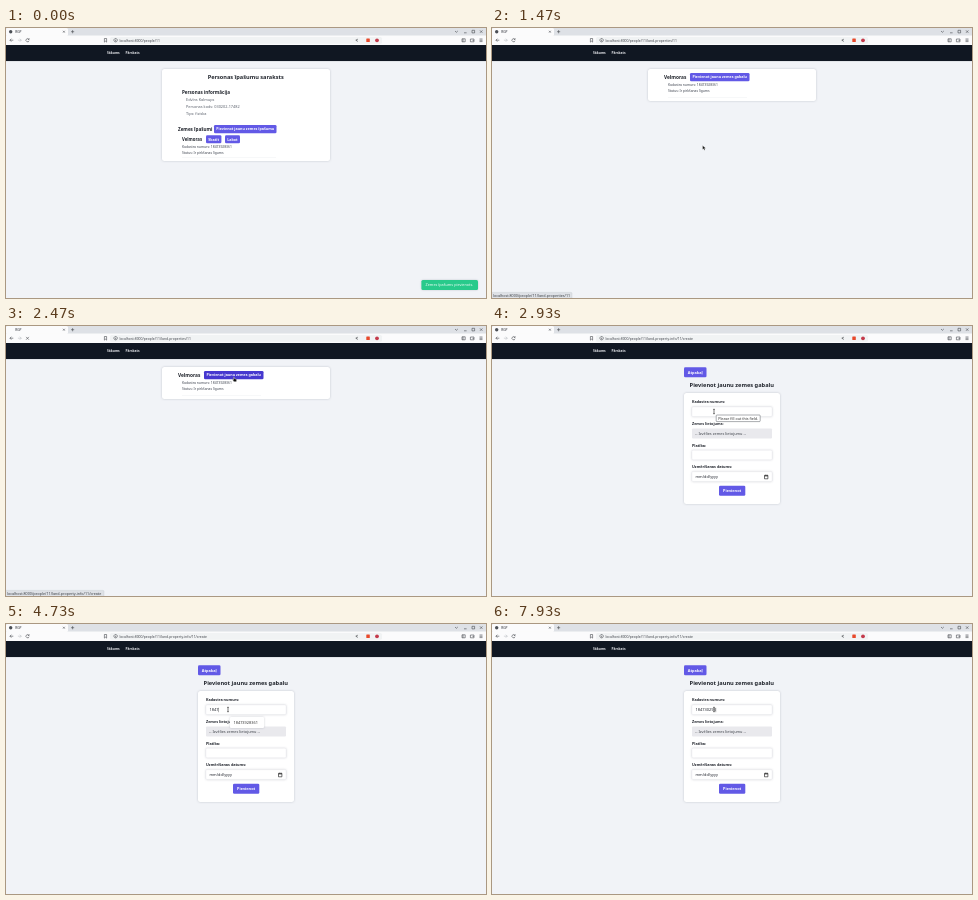
These frames come from a looping animation (480x270 px, 8 s). An HTML page:

```html
<!DOCTYPE html>
<html lang="lv">
<head>
<meta charset="utf-8">
<title>RGP</title>
<style>
html, body { margin: 0; width: 100%; height: 100%; overflow: hidden; background: #f1f3f7; }
svg { display: block; width: 480px; height: 270px; }
text { font-family: "Noto Sans", "Open Sans", sans-serif; white-space: pre; }
.bold { font-weight: 700; }
.card { filter: drop-shadow(0 .5px .8px rgba(20, 25, 50, .2)); }
.line { fill: none; stroke-width: .6; stroke: #45484d; }
</style>
</head>
<body>
<svg id="stage" viewBox="0 0 480 270"></svg>
<script>
const LOOP = 8000, STEP = 1000 / 15;
const INK = '#20242c', SOFT = '#5c626d', INDIGO = '#6259e6', INDIGO_DARK = '#4638cf';
const stage = document.getElementById('stage');

function add(parent, tag, attrs, content) {
  const el = document.createElementNS('http://www.w3.org/2000/svg', tag);
  for (const key in attrs) el.setAttribute(key, attrs[key]);
  if (content) el.textContent = content;
  return parent.appendChild(el);
}
const group = (parent = stage) => add(parent, 'g', {});
const box = (g, x, y, w, h, fill, rx = 0, more = {}) =>
  add(g, 'rect', { x, y, width: w, height: h, fill, rx, ...more });
const line = (g, d, more = {}) => add(g, 'path', { d, class: 'line', ...more });
const dot = (g, cx, cy, r, fill) => add(g, 'circle', { cx, cy, r, fill });
// cy is the middle of the capital letters
const text = (g, x, cy, size, str, fill = INK, cls = '') =>
  add(g, 'text', { x, y: cy + size * .36, 'font-size': size, fill, class: cls }, str);
const bold = (g, x, cy, size, str, fill = INK) => text(g, x, cy, size, str, fill, 'bold');
const card = (g, x, y, w, h) => box(g, x, y, w, h, '#fff', 2.5, { class: 'card' });

function button(g, x, y, w, h, size, str) {
  const back = box(g, x, y, w, h, INDIGO, 1.3);
  const label = bold(g, x + w / 2, y + h / 2, size, str, '#fff');
  label.setAttribute('text-anchor', 'middle');
  return back;
}
const show = (el, on) => { el.style.display = on ? '' : 'none'; };

// Browser frame
const chrome = group();
box(chrome, 0, 0, 480, 8, '#dee1e6');
box(chrome, 0, 0, 62, 8, '#fbfbfc', 1.5);
box(chrome, 0, 7.5, 480, 9.5, '#fbfbfc');
box(chrome, 104, 9, 272, 6.8, '#f1f3f4', 1.5);
const favicon = dot(chrome, 4.7, 3.7, 1.7, '#4b4f55');
text(chrome, 9.3, 3.8, 3.2, 'RGP');
line(chrome, 'M57 2.8l1.8 1.8m0-1.8l-1.8 1.8M65 3.7h3.2m-1.6-1.6v3.2');
line(chrome, 'M449 3l1.4 1.3l1.4-1.3M458 4.8h2.6M466 2.3h2.6v2.6h-2.6zM474 2.4l2.4 2.4m0-2.4l-2.4 2.4');
line(chrome, 'M7.3 12.2h-3.4m1.5-1.5l-1.5 1.5l1.5 1.5');
line(chrome, 'M11.9 12.2h3.4m-1.5-1.5l1.5 1.5l-1.5 1.5', { style: 'stroke:#b9bcc2' });
const reload = line(chrome, 'M22.7 11.1a1.6 1.6 0 1 0 .4 1.6M23.1 10.2v1.3h-1.3');
const stop = line(chrome, 'M20.1 10.9l2.8 2.8m0-2.8l-2.8 2.8');
line(chrome, 'M98.4 10.5h2.2v3.6l-1.1-.9l-1.1 .9z');
line(chrome, 'M109.6 10.5a1.7 1.7 0 1 0 .01 0M109.6 12v1.3M109.6 11.2v.3');
line(chrome, 'M351.8 11.2l-2 1l2 1.2', { style: 'stroke-width:.7' });
box(chrome, 360.3, 10.4, 3.5, 3.7, '#e8492b', .5);
dot(chrome, 371, 12.3, 1.9, '#c43a4b');
line(chrome, 'M456 10.8h3.2v3h-3.2zM457 10.8v3M464.4 11h3.6v2.8h-3.6zM466.5 12.4h1.5M473.5 11h3m-3 1.3h3m-3 1.3h3');
const url = text(chrome, 113.4, 12.3, 3.41, ' ', '#44484e');

box(chrome, 0, 17, 480, 16, '#101722');
bold(chrome, 101, 25.2, 3.25, 'Sākums', '#e9ebef');
bold(chrome, 119.5, 25.2, 3.25, 'Pārskats', '#e9ebef');
box(chrome, 0, 33, 480, .6, '#d9dce1');

// Person page
const person = group();
card(person, 156, 41, 168, 92);
bold(person, 201.7, 49, 5.6, 'Personas īpašumu saraksts');
bold(person, 176, 64.8, 4.55, 'Personas informācija');
['Edvīns Kalmups', 'Personas kods: 030202-17482', 'Tips: fiziska'].forEach((s, i) =>
  text(person, 180, 71.5 + i * 6.9, 3.85, s, SOFT));
bold(person, 172, 101.2, 4.6, 'Zemes īpašumi');
button(person, 208, 97, 62.5, 8.2, 3.66, 'Pievienot jaunu zemes īpašumu');
bold(person, 176, 111.4, 4.3, 'Velmoras');
const view = button(person, 200, 107.2, 15.4, 8, 3.66, 'Skatīt');
button(person, 219, 107.2, 15, 8, 3.66, 'Labot');
parcel(person, 118.8);
box(person, 176, 129.2, 94, .3, '#e5e7eb');
const toast = group(person);
box(toast, 415.4, 252, 56.6, 10, '#20c987', 1.5, { class: 'card' });
text(toast, 419.6, 257, 3.78, 'Zemes īpašums pievienots.', '#f1fff9');

function parcel(g, y) {
  text(g, 176, y, 3.35, 'Kadastra numurs: 18473928361', '#3f4550');
  text(g, 176, y + 6, 3.35, 'Status: Ir pirkšanas līgums', '#3f4550');
}

// Property page
const property = group();
card(property, 156, 41, 168, 32);
bold(property, 172, 48.9, 4.8, 'Velmoras');
const addPlot = button(property, 198, 45, 59.5, 8.2, 3.66, 'Pievienot jaunu zemes gabalu');
parcel(property, 56.8);
box(property, 176, 69.2, 79, .3, '#e5e7eb');

// Form page
const form = group();
button(form, 192, 41.3, 22.5, 10, 3.85, 'Atpakaļ');
bold(form, 197.6, 59, 5.67, 'Pievienot jaunu zemes gabalu');
card(form, 192, 67, 96, 111);
['Kadastra numurs:', 'Zemes lietojums:', 'Platība:', 'Uzmērīšanas datums:'].forEach((s, i) => {
  const y = 76 + i * 21.6;
  bold(form, 200, y, 3.72, s);
  if (i === 1) box(form, 200, y + 5, 80, 10, '#e9e9ed', 1);
  else box(form, 200, y + 5, 80, 9.6, '#fff', 1, { stroke: '#e3e5e9', 'stroke-width': .3, class: 'card' });
});
text(form, 203, 107.6, 3.85, '-- Izvēlies zemes lietojumu --', '#3f434a');
text(form, 203.5, 151, 3.82, 'mm/dd/yyyy');
line(form, 'M272.5 149.4h3.4v3.4h-3.4zM272.5 150h3.4M273.4 148.7v.8M275 148.7v.8', { style: 'stroke:#111' });
button(form, 227, 159.8, 26.3, 10, 3.9, 'Pievienot');
const typed = text(form, 203.5, 86, 3.95, ' ');
const caret = box(form, 203.4, 83.8, .35, 4.4, '#222');

const hints = group(form);
box(hints, 224, 93, 34, 11, '#fff', 1, { class: 'card' });
text(hints, 227.5, 98.4, 3.89, '18473928361', '#333');
const tooltip = group(form);
box(tooltip, 224.2, 89, 44, 6.6, '#fff', .8, { stroke: '#555a61', 'stroke-width': .5 });
text(tooltip, 226.2, 92.4, 3.7, 'Please fill out this field.', '#333');

// Link preview
const status = group();
const statusBox = box(status, -1, 264.4, 81, 7, '#dee1e6', 1, { stroke: '#b9bdc4', 'stroke-width': .3 });
const statusText = text(status, 1, 267.4, 3.68, ' ', '#3c4046');

// Pointers, each with its hot spot at 0,0
const pointer = group();
const shapes = {
  arrow: add(pointer, 'path', { d: 'M0 0v4l1-.8l.7 1.5l.8-.4l-.7-1.4l1.3-.2z', fill: '#111', stroke: '#fff', 'stroke-width': .3 }),
  hand: add(pointer, 'path', { d: 'M-.5 .2q.5-.5 .9 0v1.5l2 .5q.4.2 .3.7l-.4 1.8h-2.3l-1.5-2q.2-.7 1 0z', fill: '#111', stroke: '#fff', 'stroke-width': .35 }),
  beam: line(pointer, 'M-1-2.2q1 0 1 .6q0-.6 1-.6M0-1.6v3.4M-1 2.4q1 0 1-.6q0 .6 1 .6', { style: 'stroke:#222' })
};

// Tables of [time, value]
const path = [
  [70, 9, 236], [270, 70, 196], [530, 168, 126], [670, 200, 104], [870, 207.5, 112],
  [1330, 207.5, 112], [1470, 210.6, 117.6], [1730, 210.6, 117.6], [1930, 220, 76],
  [2130, 228, 51], [2530, 228, 51], [2670, 224, 72], [2800, 222, 85.4]
];
const shapeAt = [[0, 'arrow'], [800, 'hand'], [1400, 'arrow'], [2000, 'hand'], [2530, 'arrow'], [2730, 'beam']];
const pageAt = [[0, person], [1400, property], [2530, form]];
const loadAt = [[0, false], [1330, true], [1470, false], [2270, true], [2600, false]];
const base = 'localhost:8000/people/11', landPath = base + '/land-properties/11';
const createPath = base + '/land-property-info/11/create';
const urlAt = [[0, base], [1400, landPath], [2530, createPath]];
const statusAt = [[0, ''], [930, landPath], [1730, ''], [2130, createPath], [2600, '']];
const digits = '184730293';
const countAt = [[0, 0], [3930, 1], [4200, 2], [4470, 3], [4730, 4], [5800, 5], [6670, 6], [7000, 7], [7270, 8], [7930, 9]];
const caretAt = [[0, false], [3330, true], [3870, false], [3930, true], [5330, false], [5800, true],
  [6400, false], [6670, true], [7870, false], [7930, true]];

const at = (table, t) => table.reduce((v, row) => row[0] <= t ? row[1] : v, table[0][1]);
function place(t) {
  const i = path.findIndex(p => p[0] > t);
  if (i < 1) return path[i ? path.length - 1 : 0].slice(1);
  const a = path[i - 1], b = path[i], k = (t - a[0]) / (b[0] - a[0]);
  return [a[1] + (b[1] - a[1]) * k, a[2] + (b[2] - a[2]) * k];
}

function draw(time) {
  const t = Math.floor((time + 5) / STEP) * STEP + 5;
  const page = at(pageAt, t), loading = at(loadAt, t);
  for (const g of [person, property, form]) show(g, g === page);
  show(favicon, !loading);
  show(reload, !loading);
  show(stop, loading);
  url.textContent = at(urlAt, t);
  toast.setAttribute('opacity', t < 70 ? .96 : 1);
  view.setAttribute('fill', t >= 800 ? INDIGO_DARK : INDIGO);
  addPlot.setAttribute('fill', t >= 2000 ? INDIGO_DARK : INDIGO);

  const link = at(statusAt, t);
  show(status, link);
  statusText.textContent = link;
  statusBox.setAttribute('width', link === createPath ? 99 : 81);

  const count = at(countAt, t);
  typed.textContent = digits.slice(0, count);
  caret.setAttribute('x', 203.4 + count * 3.95 * .572);
  show(caret, at(caretAt, t));
  show(tooltip, t >= 2930 && t < 3330);
  show(hints, t >= 3330 && t < 6000);
  hints.setAttribute('opacity', Math.min(1, Math.max(0, (6000 - t) / 200)));

  const shape = at(shapeAt, t);
  show(pointer, t >= 70);
  for (const name in shapes) show(shapes[name], name === shape);
  pointer.setAttribute('transform', `translate(${place(t)})`);
}

const start = performance.now();
function tick() {
  draw((performance.now() - start) % LOOP);
  requestAnimationFrame(tick);
}
tick();
</script>
</body>
</html>
```
